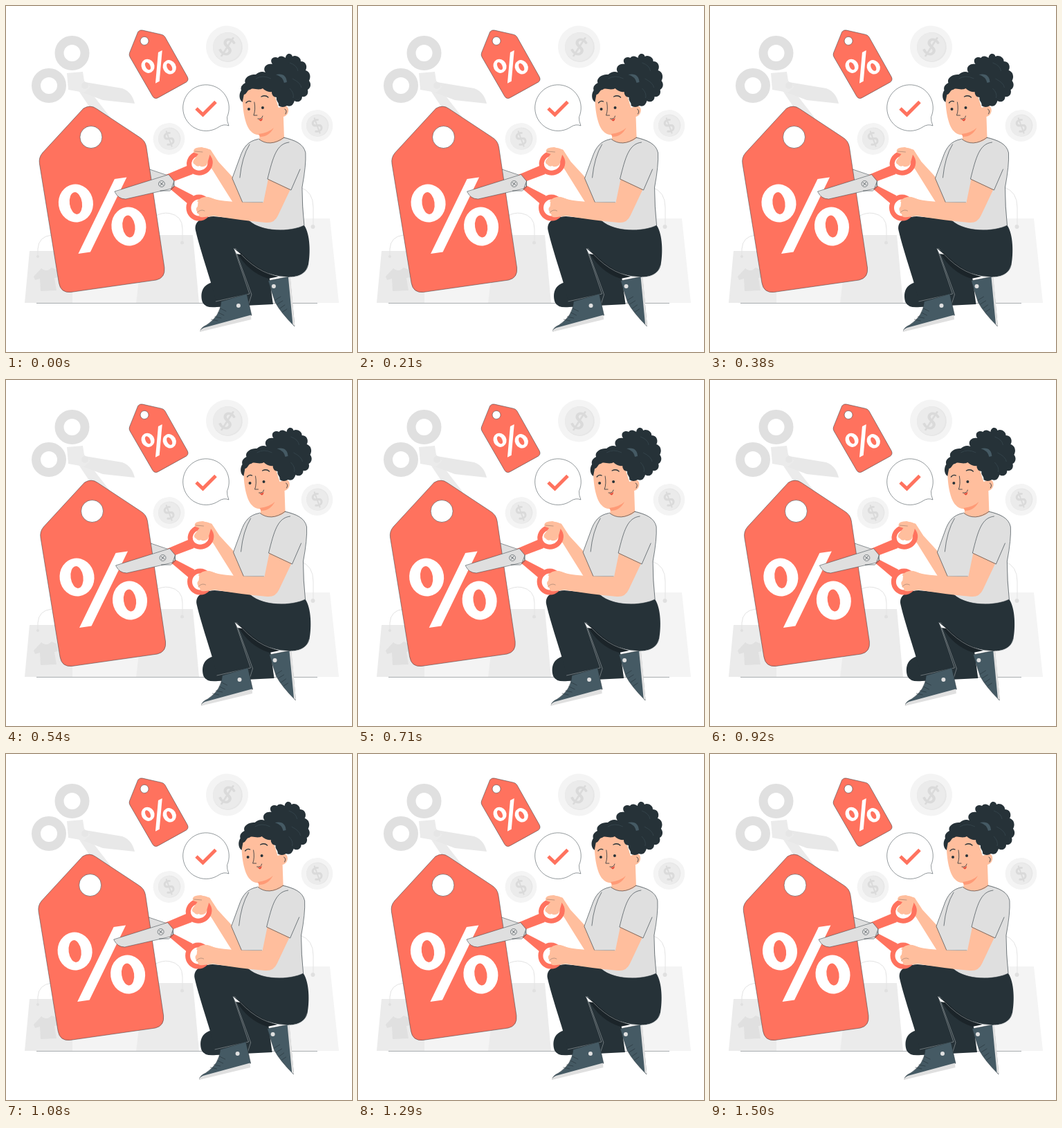
An HTML page for the animation above (1.54 s loop, 500 by 500 pixels).

```html
<!DOCTYPE html>
<html lang="en">
<head>
<meta charset="utf-8">
<title>Cutting prices</title>
<style>
  html, body { margin: 0; width: 100%; height: 100%; overflow: hidden; background: #fff }
  svg { display: block; width: 100%; height: 100% }
  .red { fill: #ff725e }
  .skin { fill: #ffbe9d }
  .dark { fill: #263238 }
  .shoe { fill: #455a64 }
  .gray { fill: #dfdfdf }
  .pale { fill: #f4f4f4 }
  .bag { fill: #ebebeb }
  .mid { fill: #e0e0e0 }
  .white { fill: #fff }
  .line { fill: none; stroke: #263238; stroke-width: .6; stroke-linecap: round; stroke-linejoin: round }
  .edge { stroke: #263238; stroke-width: .5; stroke-linejoin: round; vector-effect: non-scaling-stroke }
  .seam { fill: none; stroke: #b4babd; stroke-width: .5 }
  .handle { fill: none; stroke: #e3e3e3; stroke-width: 1 }
  .ring { fill: none; stroke: #ff725e; stroke-width: 7 }
  text { font: bold 35px Lato, sans-serif; text-anchor: middle; fill: #dadada }
</style>
</head>
<body>
<svg viewBox="0 0 500 500">
  <defs>
    <g id="tag">
      <path class="red edge" d="M112 148Q122 142 131 148.500L193 189.500Q201.500 194.500 203 204L229 378Q230.500 393 217 396L94 413.500Q79 415 76.500 400L48.500 228Q47 219 53 212Z"/>
      <circle class="white edge" cx="123" cy="189.500" r="16"/>
      <g class="white">
        <path d="M157 250L174.500 247.500 122 355.500 104.500 358Z"/>
        <ellipse cx="101" cy="285" rx="25" ry="27.500" transform="rotate(-8 101 285)"/>
        <ellipse cx="177.500" cy="318.500" rx="25" ry="28" transform="rotate(-8 177.500 318.500)"/>
      </g>
      <g class="red">
        <ellipse cx="101" cy="285" rx="9" ry="16" transform="rotate(-8 101 285)"/>
        <ellipse cx="177.500" cy="318.500" rx="9" ry="16" transform="rotate(-8 177.500 318.500)"/>
      </g>
    </g>
    <g id="coin">
      <circle class="pale" r="30.500"/>
      <circle cx="1" r="21.500" fill="#e6e6e6"/>
      <circle r="20.500" class="bag"/>
      <text y="12.500">$</text>
    </g>
  </defs>

  <g id="bags">
    <path class="bag" d="M34 354H100L96 429H27Z"/>
    <path class="pale" d="M96 354H200L188 429H96Z"/>
    <path class="bag" d="M200 331H270L279 429H188Z"/>
    <path class="pale" d="M400 307H468L481 429H392Z"/>
    <path class="handle" d="M46 362V351Q47 333 66 331M215 304Q225 298 236 299.500 255 303 255 322V342M425 262Q444 268 444 291V319"/>
    <g class="mid">
      <circle cx="46" cy="362" r="2"/>
      <circle cx="254.500" cy="342" r="2.500"/>
      <circle cx="443.500" cy="319" r="3"/>
      <path d="M51 379Q58 386 66 378L73 381 75 392 70 393 73 411 50 412 49 394 42 396 40 391Z"/>
    </g>
  </g>
  <path d="M44 429.500H450" stroke="#263238" stroke-width=".4"/>

  <use href="#coin" transform="translate(319.500 59) rotate(28)"/>
  <use href="#coin" transform="translate(235.500 192) rotate(-25) scale(.75)"/>
  <use href="#coin" transform="translate(449.500 173) rotate(-25) scale(.75)"/>

  <g id="gray-scissors">
    <path class="bag" d="M104 121L116 116 150 160 160 182 130 160Z"/>
    <path fill="#e8e8e8" d="M108 109L168 119Q182 124 186 141L140 136 108 124Z"/>
    <path class="bag" d="M88 97L111 95 113 108 122 117 113 125 90 121Z"/>
    <g fill="none" stroke="#e0e0e0" stroke-width="13">
      <circle cx="95.500" cy="68" r="18.500"/>
      <circle cx="62" cy="115" r="18.500"/>
    </g>
    <circle cx="114" cy="115" r="5" fill="#e6e6e6"/>
  </g>

  <use href="#tag" transform="translate(220.500 87.500) rotate(-20.800) scale(.374) translate(-139 -301.500)"/>

  <path class="white edge" d="M319.500 160.500A33.300 33.300 0 1 0 308 174.500Q315 170 322 173 319 166 319.500 160.500Z"/>
  <path d="M275 148L284.500 157 303 138.500" fill="none" stroke="#ff725e" stroke-width="5"/>

  <g id="front">
    <path class="gray edge" d="M190 230L240 247 243 261 222 267Z"/>
    <use href="#tag"/>

    <g id="legs">
      <path class="dark" d="M300 399C284 402 280 415 284 428Q288 437 305 435L386 431 379 380 330 350Z"/>
      <path class="dark" d="M274 324C272 312 281 305 300 304L352 309Q385 327 431 317C440 330 440 358 437 374C434 389 418 393 402 391Q375 390 350 366L331 350 352 412 303 426C300 407 281 355 274 324Z"/>
      <path fill="#1b2429" d="M340 357Q365 383 394 391L379 394Q350 385 333 355Z"/>
      <path class="white" d="M329 350L340 359 333 358Z"/>
      <path class="seam" d="M330 351L352 416 303 427M340 359Q370 391 405 391.500M333 357L355 417 350 433M437 374Q433 390 414 392"/>
    </g>

    <g id="shoes">
      <path class="shoe edge" d="M311 427L348 416 355 447 281 470Q281 465 290 461 310 448 311 427Z"/>
      <path class="mid" d="M280 471Q281 467 286 465L354 446.500 354.500 453Z"/>
      <path class="shoe edge" d="M379 397L410 391 417 463Q397 443 389 428Z"/>
      <path class="mid" d="M408 392L411 391.500 417.500 463 414.500 460Z"/>
      <circle class="mid" cx="336" cy="433" r="3"/>
      <circle class="mid" cx="387" cy="405" r="3"/>
      <path class="line" d="M310 437L318 441M307 443L315 447M302 449L311 451M297 453L306 455M389 425L397 420M392 431L400 426M396 437L403 432M400 442L406 438"/>
    </g>

    <path class="skin" d="M272 207Q284 202 296 208L307 225 330 250 343 284 328 284Q311 257 298 236L284 220Z"/>
    <path class="gray" d="M364 192C350 195 343 204 338 219L327 249 342 284 351 310C370 327 411 327 431 317L428 264C431 241 434 227 433 212C430 199 418 193 401 189Z"/>
    <path class="line" d="M364 192.500C350 195 343 204 338 219L327 249 342 284H371M352 200Q341 218 338 248M401 190C418 194 430 199 433 212Q434 230 428 262 428 290 431 317C411 327 370 327 352 311"/>
    <path class="skin" d="M278 280Q287 274 298 278 315 284 372 284L379 250 411 265 393 303Q388 314 376 313 340 310 299 303 283 305 276 299Z"/>
    <path class="line" d="M409 197C391 199 386 218 378 250L412 266 425 236"/>

    <g id="head">
      <path class="skin" d="M342 126C341 145 345 173 354 181Q359 187 367 186L366 193C377 202 397 198 402 190L401 160C410 158 411 144 402 144L394 147 383 112H347Z"/>
      <path d="M365 185Q380 183 387 176 380 189 367 189Z" fill="#ff9a76"/>
      <path class="line" d="M365 192Q381 205 402 190"/>
      <path class="dark" d="M342 139C336 135 337 126 340 122Q338 115 346 111C343 104 353 98 361 99Q368 93 375 96C370 89 377 82 385 84C380 77 387 72 393 75C397 70 402 74 404 75C405 67 413 68 414 73C419 70 427 75 426 80C434 80 436 88 433 93C440 95 441 103 438 108C442 113 440 119 436 121C438 128 433 132 428 131C428 138 421 140 417 137Q414 147 406 144 400 148 394 144C395 139 390 138 391 132Q384 131 384 124 377 125 371 119C364 123 357 117 353 121 348 121 349 127 344 128 343 132 342 139 342 139Z"/>
      <path d="M390 99Q405 96 406 110L402 111Q400 102 390 99Z" class="shoe"/>
      <path d="M410 82Q421 86 422 94M414 105Q426 111 427 118M361 105Q371 99 383 105M410 119Q417 126 415 133" fill="none" stroke="#37474f" stroke-width=".8"/>
      <path class="line" style="stroke-width:1.300" d="M347 140Q350 136 354 138M369 131Q375 128 379 132"/>
      <circle class="dark" cx="351" cy="149" r="2"/>
      <circle class="dark" cx="371" cy="147" r="2"/>
      <path class="line" style="stroke-width:.8" d="M359 139Q361 150 358 158L363 158M403 149Q407 151 404 156M364 163Q370 164 371 159"/>
      <path d="M365 164Q370 164 371 161 371 166 368 166.500Z" fill="#e64f3c"/>
    </g>

    <g id="scissors">
      <path class="red" d="M231 244L264 230 270 243 238 255Z"/>
      <path class="red" d="M237 264L244 260 271 274 263 286Z"/>
      <ellipse class="ring" cx="280" cy="227" rx="15.500" ry="14" transform="rotate(-20 280 227)"/>
      <ellipse class="ring" cx="279" cy="291.500" rx="15" ry="15.500"/>
      <path class="gray edge" d="M157 268L235 243.500 243 253 239 264 173 279Q162 279 157 268Z"/>
      <path class="line" d="M243 253L243 261 237 267 223 267"/>
      <circle class="gray edge" cx="225" cy="257" r="4.500"/>
      <path class="line" d="M222.500 255L227.500 259M227 254.500L223 259.500"/>
    </g>

    <g id="fingers">
      <path class="skin" d="M271 210Q271 204 283 204L296 208 294 217Q292 224 290 230 284 234 280 231 276 233 273 229 269 227 271 223L278 214 272 212Z"/>
      <path class="skin" d="M276 282Q285 273 296 277L306 281 303 303 287 305Q277 306 279 301L276 297Q273 292 278 289L285 287Z"/>
      <path class="line" stroke-opacity=".5" d="M273 210L284 211M277 298Q282 293 287 296"/>
    </g>
  </g>
</svg>
<script>
  const front = document.getElementById('front');
  const LOOP = 1540, LEAD = 42;
  const shake = [0, -.5, 1, -2, 2, -2, 2, -2, 1, -.5, 0];

  function draw() {
    const p = (performance.now() + LEAD) % LOOP / LOOP * 10;
    const i = Math.floor(p), s = p - i;
    const x = shake[i] + (shake[i + 1] - shake[i]) * s * s * (3 - 2 * s);
    front.setAttribute('transform', `translate(${x.toFixed(3)} 0)`);
    requestAnimationFrame(draw);
  }
  draw();
</script>
</body>
</html>
```
